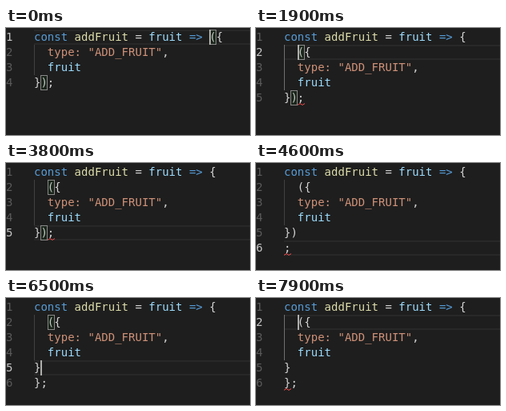
An HTML page that plays this animation: 305x134 px, repeating every 8 s.

```html
<!DOCTYPE html>
<html lang="en">
<meta charset="utf-8">
<title>Editor</title>
<style>
  html, body { margin: 0; width: 100%; height: 100%; overflow: hidden; background: #1e1e1e; }
  #editor { position: absolute; inset: 0; overflow: hidden; color: #d4d4d4;
    font: 14px/19px "DejaVu Sans Mono", monospace; white-space: pre; }
  #editor > * { position: absolute; box-sizing: border-box; height: 19px; }
  .number { left: 0; color: #5a5a5a; }
  .number.active { color: #c6c6c6; }
  .current { left: 35px; right: 0; border: solid #282828; border-width: 2px 0; }
  .line { left: 35px; }
  .guide { left: 35px; width: 1px; background: #404040; }
  .guide.active { background: #707070; }
  .box { width: 9px; border: 1px solid #888; background: rgba(0, 100, 0, .1); }
  .caret { width: 2px; background: #aeafad; }
  .squiggle { width: 9px; fill: none; stroke: #f14c4c; }
  .keyword { color: #569cd6; }
  .function { color: #dcdcaa; }
  .name { color: #9cdcfe; }
  .string { color: #ce9178; }
</style>
<div id="editor"></div>
<script>
const LOOP = 8000, LEFT = 35, TOP = 2, CELL = 8.43, ROW = 19;
const editor = document.getElementById('editor');

const head = 'const addFruit = fruit => ';
const body = ['  type: "ADD_FRUIT",', '  fruit'];
const split = [head + '{', '  ({', ...body];

// Each step changes only the listed properties; positions are [row, column].
const steps = [
  [0, { lines: [head + '({', ...body, '});'], caret: [0, 26], on: true,
        boxes: [[0, 26], [3, 1]], error: null }],
  [200, { on: false }],
  [600, { on: true }],
  [1100, { on: false }],
  [1500, { lines: [head + '{({', ...body, '});'], caret: [0, 27], on: true,
           boxes: [[0, 27], [3, 1]] }],
  [1700, { lines: [...split, '});'], caret: [1, 2], boxes: [] }],
  [1800, { boxes: [[1, 2], [4, 1]] }],
  [1900, { error: [4, 2] }],
  [2400, { on: false }],
  [2900, { caret: [2, 2], on: true }],
  [3000, { caret: [3, 2], boxes: [] }],
  [3300, { caret: [4, 2] }],
  [3400, { boxes: [[1, 2], [4, 1]] }],
  [3800, { on: false }],
  [4100, { lines: [...split, '})', ';'], caret: [5, 0], on: true, error: [5, 0] }],
  [4200, { boxes: [] }],
  [4600, { on: false }],
  [5200, { on: true }],
  [5300, { lines: [...split, '})', '};'], caret: [5, 1], error: [5, 1] }],
  [5400, { boxes: [[0, 26], [5, 0]] }],
  [5700, { error: null }],
  [5900, { caret: [4, 1] }],
  [6000, { boxes: [[1, 2], [4, 1]] }],
  [6500, { lines: [...split, '}', '};'], boxes: [[1, 2]] }],
  [6600, { caret: [3, 1], boxes: [] }],
  [6700, { caret: [2, 1] }],
  [6800, { caret: [1, 1] }],
  [6900, { error: [5, 0] }],
  [7400, { on: false }],
  [7900, { caret: [1, 2], on: true }]
];

function highlight(text) {
  return text.replace(/"[^"]*"|const|=>|addFruit|fruit|type:/g, token => {
    const kind = token[0] === '"' || token === 'type:' ? 'string'
      : token === 'const' || token === '=>' ? 'keyword'
      : token === 'addFruit' ? 'function' : 'name';
    return `<span class="${kind}">${token.replace('>', '&gt;')}</span>`;
  });
}

const rowStyle = row => `top:${TOP + row * ROW}px`;
const cellStyle = ([row, column]) =>
  `${rowStyle(row)};left:${Math.round(LEFT + column * CELL)}px`;

function render({ lines, caret, on, boxes, error }) {
  const inBlock = caret[0] > 0 && lines[caret[0]].startsWith('  ');
  let html = `<div class="current" style="${rowStyle(caret[0])}"></div>`;
  lines.forEach((text, row) => {
    const style = rowStyle(row);
    const active = row === caret[0] ? ' active' : '';
    html += `<div class="number${active}" style="${style}">${row + 1}</div>`;
    if (text.startsWith('  '))
      html += `<div class="guide${inBlock ? ' active' : ''}" style="${style}"></div>`;
    html += `<div class="line" style="${style}">${highlight(text)}</div>`;
  });
  for (const box of boxes) html += `<div class="box" style="${cellStyle(box)}"></div>`;
  if (error)
    html += `<svg class="squiggle" style="${cellStyle(error)}"><path d="M0 18.5l3-2 3 2 3-2"/></svg>`;
  if (on) html += `<div class="caret" style="${cellStyle(caret)}"></div>`;
  editor.innerHTML = html;
}

let shown = -1;
function tick() {
  const time = performance.now() % LOOP;
  const count = steps.filter(([start]) => start <= time).length;
  if (count !== shown) {
    shown = count;
    render(Object.assign({}, ...steps.slice(0, count).map(step => step[1])));
  }
  requestAnimationFrame(tick);
}
tick();
</script>
</html>
```
